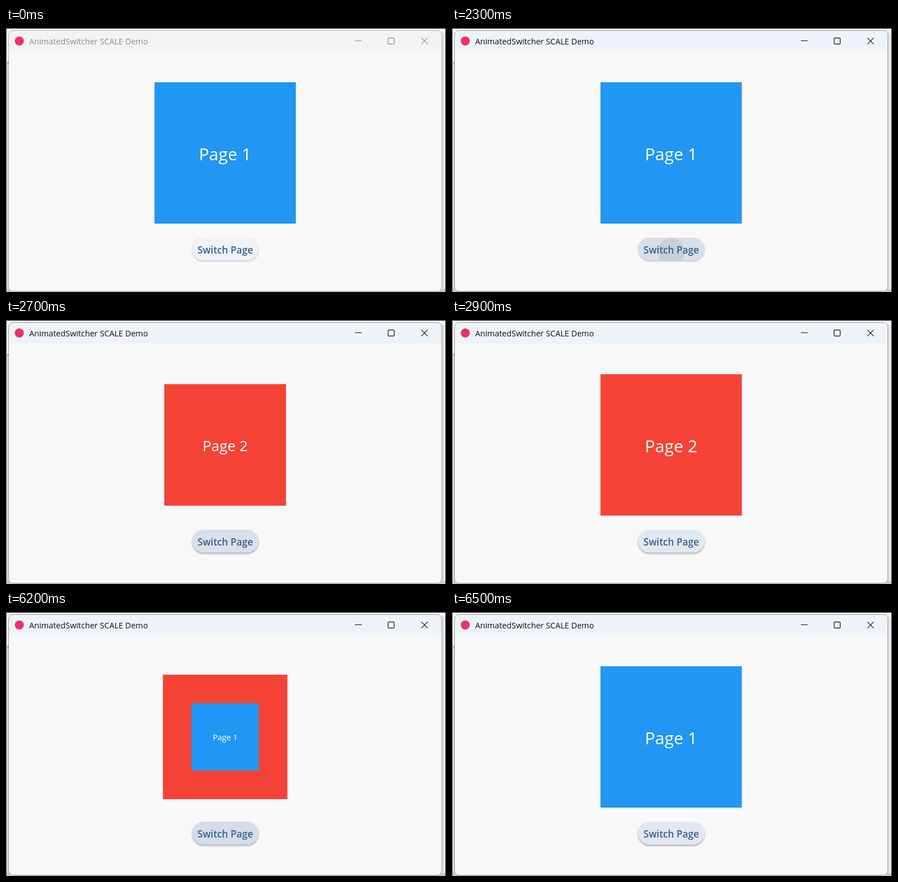
Write an HTML page that moves like this. It is 778x467 px and loops after 8000 ms.

```html
<!DOCTYPE html>
<html lang="en">
<head>
<meta charset="utf-8">
<title>AnimatedSwitcher SCALE Demo</title>
<style>
  html, body { margin: 0; width: 100%; height: 100%; overflow: hidden; background: #f4f4f4; }
  svg { display: block; width: 778px; height: 467px; font-family: "Open Sans", "Noto Sans", sans-serif; }
  .page text { font-size: 30px; fill: #fff; text-anchor: middle; }
  #title { font-size: 14.25px; }
  #label { font-size: 17.1px; font-weight: 600; fill: #36618e; text-anchor: middle; }
  #window { --ink: #8b8b8b; --bar: #f3f3f3; --edge: #b4b4b4; }
  #window.active { --ink: #111; --bar: #eef3f9; --edge: #a2a2a2; }
  #bar { fill: var(--bar); }
  #title { fill: var(--ink); }
  #controls { fill: none; stroke: var(--ink); stroke-width: 1.2; }
  #frame { fill: none; stroke: var(--edge); }
</style>
</head>
<body>
<svg viewBox="0 0 778 467">
  <defs>
    <linearGradient id="rightShade">
      <stop offset="0" stop-color="#d4d4d4"/><stop offset="1" stop-color="#f0f0f0"/>
    </linearGradient>
    <linearGradient id="leftShade">
      <stop offset="0" stop-color="#e6e6e6"/><stop offset="1" stop-color="#c8c8c8"/>
    </linearGradient>
    <clipPath id="pill"><rect x="329" y="371" width="117.5" height="40.5" rx="20.2"/></clipPath>
    <clipPath id="body"><rect x="4.5" y="4.5" width="766" height="461" rx="8"/></clipPath>
  </defs>

  <rect width="778" height="467" fill="#f4f4f4"/>
  <rect x="0" y="60" width="5" height="407" fill="url(#leftShade)"/>
  <rect x="770" y="8" width="7" height="459" fill="url(#rightShade)"/>
  <rect x="0" y="462" width="777" height="5" fill="#c9c9c9"/>
  <path d="M0 .5H778" stroke="#000"/>
  <path d="M777.5 0V467" stroke="#000"/>
  <path d="M.5 0V467" stroke="#555"/>
  <circle cx="5" cy="61.5" r="2" fill="#3a22a8"/>

  <g id="window">
    <g clip-path="url(#body)">
      <rect x="4" y="4" width="768" height="463" fill="#f8f8f8"/>
      <rect id="bar" x="4" y="4" width="768" height="37.5"/>
    </g>
    <rect id="frame" x="4.5" y="4.5" width="766" height="461" rx="8"/>
    <circle cx="23.5" cy="23" r="8" fill="#ee3167"/>
    <text id="title" x="41" y="29">AnimatedSwitcher SCALE Demo</text>
    <g id="controls">
      <path d="M617 22.5H629M734.3 17.3L745.7 28.7M745.7 17.3L734.3 28.7"/>
      <rect x="675.6" y="17.6" width="10.8" height="10.8" rx="1.5"/>
    </g>
  </g>

  <rect id="backdrop" x="262.5" y="96" width="250" height="250" fill="#f9f9fe"/>
  <g id="pages">
    <g class="page" id="page1">
      <rect x="-125" y="-125" width="250" height="250" fill="#2196f3"/>
      <text y="13">Page 1</text>
    </g>
    <g class="page" id="page2">
      <rect x="-125" y="-125" width="250" height="250" fill="#f44336"/>
      <text y="13">Page 2</text>
    </g>
  </g>

  <rect id="button" x="329" y="371" width="117.5" height="40.5" rx="20.2"/>
  <g clip-path="url(#pill)"><circle id="ripple" cx="387.5" cy="395.5" fill="#c6d0dc"/></g>
  <text id="label" x="387.7" y="399">Switch Page</text>
</svg>
<script>
  const LOOP = 8000, TICK = 100, GROW = 400, SHRINK = 800;
  const PRESSES = [2300, 5900], SWITCHES = [2433.4, 6099.6];
  const $ = id => document.getElementById(id);
  const clamp = v => Math.min(1, Math.max(0, v));

  function bounceOut(t) {
    const k = 7.5625, d = 2.75;
    if (t < 1 / d) return k * t * t;
    if (t < 2 / d) return k * (t - 1.5 / d) ** 2 + 0.75;
    if (t < 2.5 / d) return k * (t - 2.25 / d) ** 2 + 0.9375;
    return k * (t - 2.625 / d) ** 2 + 0.984375;
  }

  function mix(a, b, p) {
    return `rgb(${a.map((v, i) => Math.round(v + (b[i] - v) * p))})`;
  }

  function setScale(page, s) {
    page.setAttribute("transform", `translate(387.5 221) scale(${s})`);
    page.style.display = s > 0.002 ? "" : "none";
  }

  function drawPages(t) {
    const [first, second] = SWITCHES;
    const start = t >= second ? second : first;
    const [incoming, outgoing] = t >= second
      ? [$("page1"), $("page2")] : [$("page2"), $("page1")];
    if ($("pages").lastElementChild !== incoming) $("pages").append(incoming);
    setScale(incoming, bounceOut(clamp((t - start) / GROW)));
    setScale(outgoing, 1 - bounceOut(clamp((t - start) / SHRINK)));
    $("backdrop").style.display = t >= second && t < second + GROW ? "" : "none";
  }

  function drawButton(t) {
    const press = PRESSES.filter(p => p <= t).pop();
    const age = press === undefined ? Infinity : t - press;
    const hover = [227, 231, 240], dark = [209, 216, 230], pressed = [216, 222, 234];
    let fill = mix(dark, hover, clamp((age - 200) / 400));
    if (age < 200) fill = mix(pressed, dark, age / 200);
    if (t < 1600) fill = t < 1500 ? "#f0f1f9" : "#ebeef8";
    const raised = t >= 1600 && age >= 200;
    $("button").style.fill = fill;
    $("button").style.filter = raised
      ? "drop-shadow(0 2px 1.8px rgba(0,0,0,.32))"
      : "drop-shadow(0 1px .8px rgba(0,0,0,.28))";
    $("ripple").setAttribute("r", age < 200 ? 24 + age * 0.24 : 0);
    $("ripple").style.opacity = clamp(1 - age / 200);
  }

  function draw(now) {
    const t = Math.floor((now % LOOP) / TICK) * TICK;
    $("window").classList.toggle("active", t >= PRESSES[0]);
    drawPages(t);
    drawButton(t);
  }

  const origin = performance.now();
  function loop() {
    draw(performance.now() - origin);
    requestAnimationFrame(loop);
  }
  loop();
</script>
</body>
</html>
```
